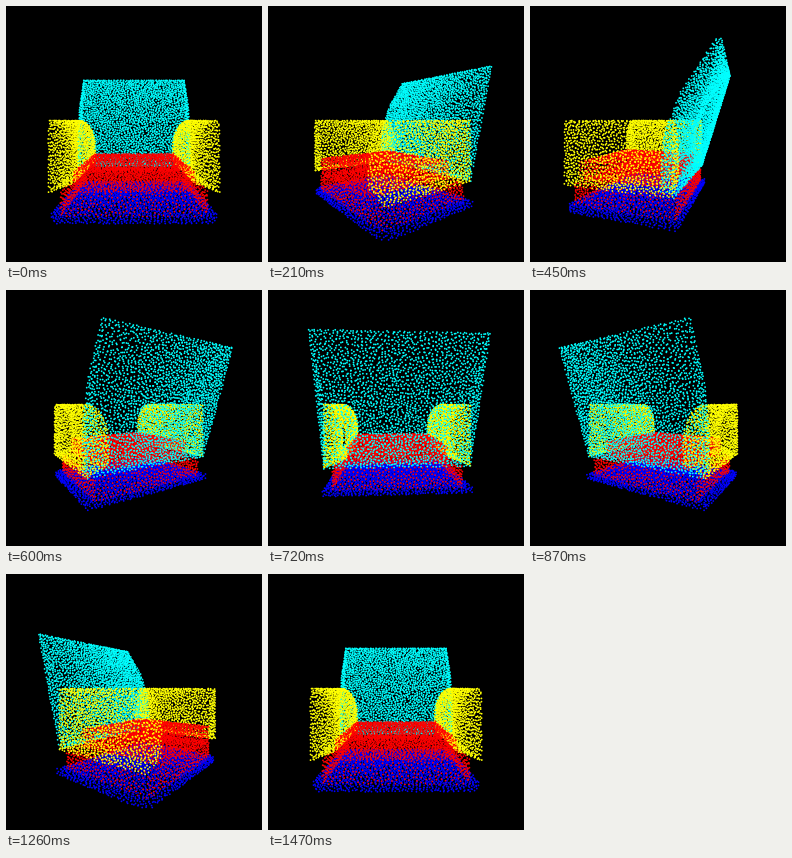
A matplotlib script for the animation above (1500 ms loop, 256x256 px).

```python
import numpy as np
import matplotlib.pyplot as plt
from matplotlib.animation import FuncAnimation

SIZE, DPI = 256, 64
FRAMES, INTERVAL = 50, 30
FOCAL, CENTER, HORIZON = 222, 128, 114.5   # 60 degree lens, camera distance 1
SPACING = 0.0145
CANDIDATES = 6                             # random points tried per kept point
DOT = 1.8                                  # dot diameter in pixels

CYAN, YELLOW, RED, BLUE = (0, 1, 1), (1, 1, 0), (1, 0, 0), (0, 0, 1)

rng = np.random.default_rng(7)


def lerp(a, b, t):
    return a + (b - a) * t


def sheet(surface, len_u, len_v):
    """Random points on surface(u, v) -> x, height, z; NaN points are dropped."""
    n = max(1, round(CANDIDATES * len_u * len_v / SPACING ** 2))
    u, v = rng.random((2, n))
    pts = np.stack([np.broadcast_to(c, u.shape) for c in surface(u, v)], axis=1)
    return pts[~np.isnan(pts).any(axis=1)]


def wall(p, q, low, high):
    """Vertical wall over the floor segment p-q, each given as (x, z)."""
    return sheet(
        lambda u, v: (lerp(p[0], q[0], u), lerp(low, high, v), lerp(p[1], q[1], u)),
        np.hypot(q[0] - p[0], q[1] - p[1]), high - low)


def ring(corners, low, high):
    return [wall(p, q, low, high) for p, q in zip(corners, corners[1:] + corners[:1])]


def rect(half, z0, z1):
    return [(-half, z0), (half, z0), (half, z1), (-half, z1)]


def slab(half, z0, z1, h, chamfer=0.0):
    """Horizontal rectangle whose front corners may be cut."""
    def surface(u, v):
        z = lerp(z0, z1, v)
        w = half - np.maximum(0, z - (z1 - chamfer))
        return w * (2 * u - 1), h, z
    return sheet(surface, 2 * half, z1 - z0)


def thin(sheets):
    """Farthest point sampling, which spreads the dots evenly."""
    pts = np.concatenate(sheets)
    axes = np.ascontiguousarray(pts.T)
    gap = np.full(len(pts), np.inf)
    kept = [0]
    for _ in range(len(pts) // CANDIDATES - 1):
        dx, dy, dz = axes - axes[:, kept[-1], None]
        np.minimum(gap, dx * dx + dy * dy + dz * dz, out=gap)
        kept.append(int(gap.argmax()))
    return pts[kept]


def backrest():
    top, low, front_low = 0.232, -0.24, -0.21

    def half(h):
        return 0.285 + 0.02 * h

    def rear(h):
        return lerp(-0.155, -0.298, (h - low) / (top - low))

    def front(h):
        return np.interp(h, [front_low, -0.05, 0.0875, top],
                         [-0.11, -0.12, -0.178, -0.28])

    def face(depth, bottom):
        def surface(u, v):
            h = lerp(bottom, top, v)
            return half(h) * (2 * u - 1), h, depth(h)
        return surface

    def flank(side):
        def surface(u, v):
            h = lerp(-0.225, top, v)
            return side * half(h), h, lerp(rear(h), front(h), u)
        return surface

    def lid(u, v):
        return half(top) * (2 * u - 1), top, lerp(rear(top), front(top), v)

    def underside(u, v):
        h = lerp(low, front_low, v)
        return half(h) * (2 * u - 1), h, lerp(rear(low), front(front_low), v)

    return [sheet(face(rear, low), 0.57, 0.49),
            sheet(face(front, front_low), 0.57, 0.48),
            sheet(flank(-1), 0.06, 0.46), sheet(flank(1), 0.06, 0.46),
            sheet(lid, 0.58, 0.02), sheet(underside, 0.56, 0.05)]


def arm(side):
    outer, depth, tall, z0, z1 = 0.283, 0.083, 0.24, -0.15, 0.268

    # Inner profile: rounded top, upright side, sloping underside.
    a = np.linspace(0, np.pi / 2, 10)
    bulge = np.append(depth * np.sin(a), [depth, 0])
    drop = np.append(0.13 * (1 - np.cos(a)), [0.207, tall])
    arc = np.append(0, np.cumsum(np.hypot(np.diff(bulge), np.diff(drop))))

    def inner(u, v):
        t = v * arc[-1]
        x = outer - np.interp(t, arc, bulge)
        return side * x, -np.interp(t, arc, drop), lerp(z0, z1, u)

    def cap(z):
        def surface(u, v):
            inside = u * depth < np.interp(v * tall, drop, bulge)
            x = np.where(inside, outer - u * depth, np.nan)
            return side * x, -tall * v, z
        return surface

    return [wall((side * outer, z0), (side * outer, z1), -tall, 0),
            sheet(inner, z1 - z0, arc[-1]),
            sheet(cap(z0), depth, tall), sheet(cap(z1), depth, tall)]


def seat():
    return [slab(0.2, -0.12, 0.266, -0.168), slab(0.2, -0.12, 0.266, -0.238),
            *ring(rect(0.2, -0.12, 0.266), -0.238, -0.168),
            *ring(rect(0.25, -0.15, 0.25), -0.325, -0.24)]


def base():
    half, z0, z1, cut = 0.283, -0.165, 0.27, 0.03
    low, high = -0.34, -0.318
    outline = [(-half, z0), (half, z0), (half, z1 - cut), (half - cut, z1),
               (cut - half, z1), (-half, z1 - cut)]
    return [slab(half, z0, z1, low, cut), slab(half, z0, z1, high, cut),
            *ring(outline, low, high)]


parts = [(CYAN, backrest()), (YELLOW, arm(-1)), (YELLOW, arm(1)),
         (RED, seat()), (BLUE, base())]
clouds = [(color, thin(sheets)) for color, sheets in parts]
X, H, Z = np.concatenate([pts for _, pts in clouds]).T
COLORS = np.concatenate([np.tile(color, (len(pts), 1)) for color, pts in clouds])

fig = plt.figure(figsize=(SIZE / DPI, SIZE / DPI), dpi=DPI, facecolor="black")
ax = fig.add_axes([0, 0, 1, 1])
ax.set_xlim(0, SIZE)
ax.set_ylim(SIZE, 0)
ax.axis("off")
dots = ax.scatter(X, H, s=(DOT * 72 / DPI) ** 2, c=COLORS, linewidths=0)


def draw(i):
    # The last pose closes the full turn and equals the first.
    a = 2 * np.pi * i / (FRAMES - 1)
    x = X * np.cos(a) - Z * np.sin(a)
    z = X * np.sin(a) + Z * np.cos(a)
    order = np.argsort(z)
    scale = FOCAL / (1 - z)
    xy = np.column_stack([CENTER + x * scale, HORIZON - H * scale])
    dots.set_offsets(xy[order])
    dots.set_facecolor(COLORS[order])
    return (dots,)


anim = FuncAnimation(fig, draw, frames=FRAMES, interval=INTERVAL,
                     repeat=True, repeat_delay=0, blit=False)
plt.show()
```
